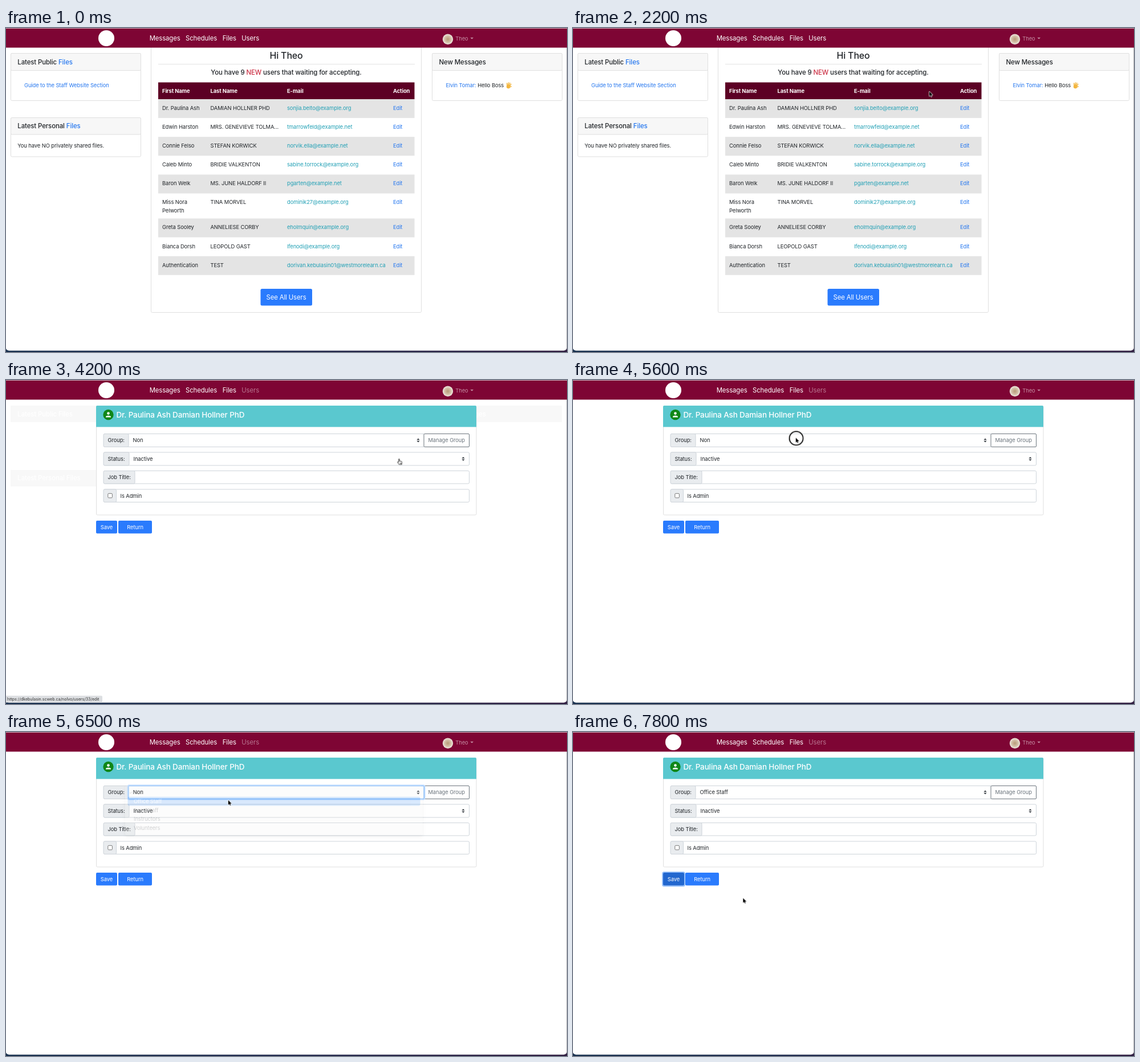
Animation of 984 by 569 pixels, one loop 8000 ms. Source, as an HTML page:

```html
<!DOCTYPE html>
<html lang="en">
<head>
<meta charset="utf-8">
<title>Staff dashboard</title>
<style>
html, body { margin: 0; width: 100%; height: 100%; overflow: hidden; background: #fff; }
svg { display: block; width: 984px; height: 569px; }
text { font: 9.4px Inter, "Noto Sans", sans-serif; letter-spacing: -.01em; fill: #212529; white-space: pre; }
.nav { font-size: 11.35px; fill: #fff; }
.h5 { font-size: 11.45px; font-weight: 500; }
.h3 { font-size: 16px; font-weight: 500; }
.title { font-size: 13.5px; font-weight: 500; fill: #fff; }
.th { font-weight: 700; fill: #fff; }
.mid { text-anchor: middle; }
.white { fill: #fff; }
.big { font-size: 11.35px; }
.dim { fill: #fff; fill-opacity: .55; }
.link { fill: #2577ef; }
.mail { fill: #22a0b5; }
.url { font-size: 7.05px; letter-spacing: 0; fill: #333; }
.box { fill: #fff; stroke: #dfdfdf; }
.cap { fill: #f7f7f7; stroke: #dfdfdf; }
.field { fill: #fff; stroke: #ced4da; }
.tag { fill: #e9ecef; stroke: #ced4da; }
.btn { fill: #2a7bfd; }
.soft { fill: #f8f8f8; }

/* 100 ms is 1.25% of the loop */
.a { animation: 8s step-end -10ms infinite; }
.home { animation-name: home; }
.form { animation-name: form; }
.ghost { animation-name: ghost; }
.status { animation-name: status; }
.hover { animation-name: hover; }
.edit { animation-name: edit; }
.dimmed { animation-name: dimmed; }
.menu { animation-name: menu; }
.mark { animation-name: mark; }
.first { animation-name: first; }
.second { animation-name: second; }
.focus { animation-name: focus; }
.before { animation-name: before; }
.after { animation-name: after; }
.save { animation-name: save; }
.saved { animation-name: saved; }
.ptr { animation-name: path, appear; }
.arrow { animation-name: arrow; }
.hand { animation-name: hand; }
.ring { animation-name: ring; }

@keyframes home { 0% { opacity: 1 } 52.5%, to { opacity: 0 } }
@keyframes form { 0% { opacity: 0 } 52.5%, to { opacity: 1 } }
@keyframes dimmed { 0% { fill-opacity: 1 } 52.5%, to { fill-opacity: .45 } }
@keyframes ghost { 0% { opacity: 0 } 52.5% { opacity: 1 } 53.75% { opacity: .5 } 55% { opacity: .2 } 56.25%, to { opacity: 0 } }
@keyframes status { 0% { opacity: 0 } 46.25% { opacity: .5 } 47.5% { opacity: 1 } 55% { opacity: .5 } 56.25%, to { opacity: 0 } }
@keyframes hover {
  0% { opacity: 0; y: 334.5px; height: 33px }
  15% { opacity: 1; y: 334.5px; height: 33px }
  20% { opacity: 1; y: 367.5px; height: 33px }
  21.25% { opacity: 1; y: 401px; height: 33px }
  22.5% { opacity: 1; y: 334.5px; height: 33px }
  23.75% { opacity: 1; y: 290.5px; height: 44px }
  25% { opacity: 1; y: 224.5px; height: 33px }
  26.25% { opacity: 1; y: 158px; height: 33px }
  27.5% { opacity: 0; y: 125px; height: 33px }
  38.75%, to { opacity: 1; y: 125px; height: 33px }
}
@keyframes edit { 0% { fill: #2577ef; text-decoration: none } 45%, to { fill: #1a57ac; text-decoration: underline } }
@keyframes menu { 0% { opacity: 0 } 71.25% { opacity: 1 } 81.25% { opacity: .2 } 82.5%, to { opacity: 0 } }
@keyframes mark { 0% { y: 98px } 75%, to { y: 113.7px } }
@keyframes first { 0% { fill: #fff } 75%, to { fill: #222 } }
@keyframes second { 0% { fill: #222 } 75%, to { fill: #fff } }
@keyframes focus { 0% { opacity: 0 } 71.25% { opacity: 1 } 91.25%, to { opacity: 0 } }
@keyframes before { 0% { opacity: 1 } 82.5%, to { opacity: 0 } }
@keyframes after { 0% { opacity: 0 } 82.5%, to { opacity: 1 } }
@keyframes save { 0% { fill: #2a7bfd } 90%, to { fill: #2267cf } }
@keyframes saved { 0% { opacity: 0 } 92.5%, to { opacity: 1 } }
@keyframes appear { 0% { opacity: 0 } 6.25%, to { opacity: 1 } }
@keyframes arrow { 0% { opacity: 1 } 45% { opacity: 0 } 55% { opacity: 1 } 88.75% { opacity: 0 } 96.25%, to { opacity: 1 } }
@keyframes hand { 0% { opacity: 0 } 45% { opacity: 1 } 55% { opacity: 0 } 88.75% { opacity: 1 } 96.25%, to { opacity: 0 } }
@keyframes ring { 0% { opacity: 0 } 70% { opacity: 1 } 71.25% { opacity: 0 } 80% { opacity: 1 } 81.25% { opacity: 0 } 91.25% { opacity: 1 } 92.5%, to { opacity: 0 } }
@keyframes path {
  0% { transform: translate(925px, 386px) }
  12.5% { transform: translate(925px, 386px); animation-timing-function: steps(3) }
  16.25% { transform: translate(360px, 344px) }
  18.75% { transform: translate(360px, 344px); animation-timing-function: steps(2) }
  21.25% { transform: translate(400px, 430px); animation-timing-function: steps(5) }
  27.5% { transform: translate(625px, 111.5px) }
  28.75% { transform: translate(625px, 111.5px); animation-timing-function: steps(4) }
  33.75% { transform: translate(523px, 118px) }
  35% { transform: translate(523px, 118px); animation-timing-function: steps(6) }
  42.5% { transform: translate(702px, 138px); animation-timing-function: steps(3) }
  46.25% { transform: translate(689.5px, 138.5px) }
  58.75% { transform: translate(689.5px, 138.5px); animation-timing-function: steps(2) }
  61.25% { transform: translate(439px, 187px) }
  63.75% { transform: translate(439px, 187px); animation-timing-function: steps(4) }
  68.75% { transform: translate(390.7px, 101.5px) }
  73.75% { transform: translate(390.7px, 101.5px); animation-timing-function: steps(2) }
  76.25% { transform: translate(389.8px, 119.7px) }
  81.25% { transform: translate(389.8px, 119.7px); animation-timing-function: steps(7) }
  90% { transform: translate(178px, 260px) }
  95% { transform: translate(178px, 260px); animation-timing-function: steps(2) }
  97.5%, to { transform: translate(298.3px, 291.7px) }
}
</style>
</head>
<body>
<svg viewBox="0 0 984 569">
  <defs>
    <linearGradient id="desk"><stop stop-color="#17304f"/><stop offset=".5" stop-color="#20294d"/><stop offset="1" stop-color="#2f1c40"/></linearGradient>
    <radialGradient id="photo"><stop stop-color="#b79a78"/><stop offset=".6" stop-color="#d3c0a8"/><stop offset="1" stop-color="#efe9e2"/></radialGradient>
    <filter id="shade" x="-5%" y="-20%" width="110%" height="150%"><feDropShadow dx="0" dy="3" stdDeviation="3" flood-opacity=".25"/></filter>
    <g id="sort" fill="#343a40"><path d="M-2.6-.8L0-3.6L2.6-.8ZM-2.6.8L0 3.6L2.6.8Z"/></g>
  </defs>

  <!-- window -->
  <rect y="560" width="984" height="9" fill="url(#desk)"/>
  <rect y="-10" width="984" height="576.5" rx="5" fill="#b4b4b8"/>
  <rect y="-10" width="983" height="576.5" rx="5" fill="#fff"/>

  <!-- dashboard -->
  <g class="a home">
    <rect class="box" x="254.5" y="20.5" width="474" height="479" rx="2"/>
    <text class="h3 mid" x="491.5" y="54">Hi Theo</text>
    <path d="M267 63.5H717" stroke="#e3e3e3"/>
    <text class="h5 mid" x="491.5" y="82.2">You have 9 <tspan fill="#cb3044">NEW</tspan> users that waiting for accepting.</text>
    <rect x="267" y="95.5" width="449.5" height="29.5" fill="#5c0024"/>
    <text class="th" x="274" y="113.8">First Name</text>
    <text class="th" x="358.5" y="113.8">Last Name</text>
    <text class="th" x="493" y="113.8">E-mail</text>
    <text class="th" x="679" y="113.8">Action</text>
    <g id="stripes"></g>
    <rect class="a hover" x="267" width="449.5" fill="#000" fill-opacity=".06"/>
    <g id="rows"></g>
    <rect class="btn" x="446.5" y="458" width="90.5" height="29.5" rx="2.5"/>
    <text class="big white mid" x="491.5" y="477">See All Users</text>

    <rect class="box" x="8.5" y="44.5" width="228" height="83" rx="2"/>
    <rect class="cap" x="8.5" y="44.5" width="228" height="30" rx="2"/>
    <text class="h5" x="20.3" y="63.8">Latest Public <tspan class="link">Files</tspan></text>
    <text class="link" x="32" y="104.4">Guide to the Staff Website Section</text>

    <rect class="box" x="8.5" y="157.5" width="228" height="68.5" rx="2"/>
    <rect class="cap" x="8.5" y="157.5" width="228" height="29.5" rx="2"/>
    <text class="h5" x="20.3" y="176.3">Latest Personal <tspan class="link">Files</tspan></text>
    <text x="20.3" y="209.8">You have NO privately shared files.</text>

    <rect class="box" x="747.5" y="44.5" width="228" height="83" rx="2"/>
    <rect class="cap" x="747.5" y="44.5" width="228" height="30" rx="2"/>
    <text class="h5" x="759.5" y="63.8">New Messages</text>
    <text x="771.5" y="104.4"><tspan class="link">Elvin Tomar:</tspan> Hello Boss</text>
    <g transform="translate(881.5 101) rotate(12)" stroke="#f3b63f" stroke-linecap="round" fill="none">
      <path d="M-2.6 0L-3.6-3.4M-1-1V-5M.9-1L1.5-4.8M2.4 0L3.8-3.2M2 3L5 .6" stroke-width="1.5"/>
      <ellipse cy="1.8" rx="2.8" ry="3" fill="#f3b63f"/>
    </g>
  </g>

  <!-- leftovers of the previous page -->
  <g class="a ghost">
    <path class="soft" d="M8 45H975V74H8ZM8 158H236V187H8Z"/>
    <text class="h5 white" x="20.3" y="63.8">Latest Public Files</text>
    <text class="h5 white" x="20.3" y="176.3">Latest Personal Files</text>
    <text class="h5 white" x="759.5" y="63.8">New Messages</text>
  </g>

  <!-- user form -->
  <g class="a form">
    <rect class="box" x="158.5" y="45.5" width="666.5" height="191.5" rx="2"/>
    <path d="M158 82.5V47a2 2 0 0 1 2-2H823a2 2 0 0 1 2 2V82.5Z" fill="#5ac8cf"/>
    <circle cx="179.5" cy="61" r="9.2" fill="#108718"/>
    <path d="M175 65.5v-1c0-2.8 9-2.8 9 0v1Z" fill="#fff"/>
    <circle cx="179.5" cy="58.6" r="2.3" fill="#fff"/>
    <text class="title" x="193.5" y="65.8">Dr. Paulina Ash Damian Hollner PhD</text>

    <rect class="field" x="171.5" y="94.5" width="641" height="23" rx="2"/>
    <rect class="tag" x="171" y="94.5" width="44" height="23" rx="2"/>
    <text x="178.5" y="109.4">Group:</text>
    <rect x="733" y="94.5" width="79.5" height="23" rx="1.5" fill="#fff" stroke="#6c757d"/>
    <text class="mid" x="772.7" y="109.4" style="fill:#6c757d">Manage Group</text>
    <g class="a focus" fill="#fff">
      <rect x="214" y="94" width="520" height="24" rx="2" stroke="#bfdcff" stroke-width="3"/>
      <rect x="215" y="94.8" width="518" height="22.4" rx="1.5" stroke="#74b2f8"/>
    </g>
    <text class="a before" x="222.5" y="109.4">Non</text>
    <text class="a after" x="222.5" y="109.4">Office Staff</text>
    <use href="#sort" x="723" y="106"/>

    <rect class="field" x="171.5" y="127" width="641" height="23" rx="2"/>
    <rect class="tag" x="171" y="127" width="45" height="23" rx="2"/>
    <text x="178.5" y="141.9">Status:</text>
    <text x="223.5" y="141.9">Inactive</text>
    <use href="#sort" x="802" y="138.5"/>

    <rect class="field" x="171.5" y="159.5" width="641" height="22.5" rx="2"/>
    <rect class="tag" x="171" y="159.5" width="55" height="22.5" rx="2"/>
    <text x="178.5" y="174.3">Job Title:</text>

    <rect class="field" x="171.5" y="192" width="641" height="22.5" rx="2"/>
    <rect class="tag" x="171" y="192" width="22.5" height="22.5" rx="2"/>
    <rect x="178.8" y="199.3" width="7.6" height="7.6" rx="1.5" fill="#fff" stroke="#777"/>
    <text x="200.5" y="206.7">Is Admin</text>

    <rect class="a saved" x="157.2" y="246.2" width="38.6" height="24.2" rx="2.5" fill="none" stroke="#8fbcfb" stroke-width="2"/>
    <rect class="btn a save" x="158" y="247" width="37" height="22.5" rx="2"/>
    <text class="white mid" x="176.5" y="261.7">Save</text>
    <rect class="btn" x="197" y="247" width="59" height="22.5" rx="2"/>
    <text class="white mid" x="226.6" y="261.7">Return</text>

    <g class="a menu">
      <rect x="209" y="94" width="522" height="87" rx="4" fill="#f1f1f1" filter="url(#shade)"/>
      <rect class="a mark" x="213.5" width="513" height="15.7" rx="2.5" fill="#3f8ff5"/>
      <text class="a first" x="216" y="109.3" style="font-size:6.5px">✓</text>
      <text class="a first" x="224" y="109.3">Non</text>
      <text class="a second" x="224" y="125">Office Staff</text>
      <text x="224" y="140.7">Barn Staff</text>
      <text x="224" y="156.4">Instructors</text>
      <text x="224" y="172.1">Volunteers</text>
    </g>
  </g>

  <!-- top bar -->
  <rect width="984" height="1" fill="#cdb7c0"/>
  <rect y="1" width="984" height="33.5" fill="#7e0534"/>
  <circle cx="176" cy="18" r="14" fill="#fff"/>
  <text class="nav" x="251.7" y="22.2">Messages</text>
  <text class="nav" x="315" y="22.2">Schedules</text>
  <text class="nav" x="379.7" y="22.2">Files</text>
  <text class="nav a dimmed" x="413.3" y="22.2">Users</text>
  <circle cx="775" cy="19.7" r="9.2" fill="url(#photo)"/>
  <text class="dim" x="788.3" y="21.8">Theo</text>
  <path class="dim" d="M814.3 16.8H820L817.2 19.6Z"/>

  <!-- link address -->
  <g class="a status">
    <path d="M0 554.5H167a2 2 0 0 1 2 2V566.5H0Z" fill="#dcdee1"/>
    <text class="url" x="2" y="563">https://dkebulasin.scweb.ca/nolvo/users/33/edit</text>
  </g>

  <!-- pointer -->
  <g class="a ptr">
    <circle class="a ring" cx=".8" cy=".9" r="12" fill="none" stroke="#000" stroke-width="1.8"/>
    <path class="a arrow" d="M0 0V8.2L1.9 6.4L3.2 9.3L4.5 8.7L3.2 5.9H5.9Z" stroke="#fff" stroke-width="1.3" stroke-linejoin="round" paint-order="stroke"/>
    <path class="a hand" d="M-.8.8C-.8-.3.8-.3.8.8V3.8L4 4.5C5 4.7 5.4 5.3 5.2 6.3L4.6 10H.2L-2.6 6.4C-3.2 5.5-2.2 4.8-1.5 5.4L-.8 6Z M2 7V8.6M3.4 7V8.6" fill="#fff" stroke="#111" stroke-width=".9" stroke-linejoin="round"/>
  </g>
</svg>
<script>
const users = [
  ["Dr. Paulina Ash", "DAMIAN HOLLNER PHD", "sonjia.belto@example.org"],
  ["Edwin Harston", "MRS. GENEVIEVE TOLMA...", "tmarrowfeld@example.net"],
  ["Connie Felso", "STEFAN KORWICK", "norvik.ella@example.net"],
  ["Caleb Minto", "BRIDIE VALKENTON", "sabine.torrock@example.org"],
  ["Baron Welk", "MS. JUNE HALDORF II", "pgarten@example.net"],
  ["Miss Nora|Pelworth", "TINA MORVEL", "dominik27@example.org"],
  ["Greta Sooley", "ANNELIESE CORBY", "eholmquin@example.org"],
  ["Bianca Dorsh", "LEOPOLD GAST", "lfenodi@example.org"],
  ["Authentication", "TEST", "dorivan.kebulasin01@westmorelearn.ca"]
];
const label = (x, y, s, cls = "") => `<text class="${cls}" x="${x}" y="${y}">${s}</text>`;
let rowY = 125, stripes = "", rows = "";
users.forEach(([first, last, mail], i) => {
  const lines = first.split("|");
  const height = lines.length > 1 ? 44 : 33.1;
  const base = rowY + 18.9;
  if (i % 2 == 0) stripes += `<rect x="267" y="${rowY}" width="449.5" height="${height}" fill="#e4e4e4"/>`;
  lines.forEach((s, n) => rows += label(274, base + n * 14.5, s));
  rows += label(358.5, base, last) + label(493, base, mail, "mail")
    + label(679, base, "Edit", i ? "link" : "link a edit");
  rowY += height;
});
document.getElementById("stripes").innerHTML = stripes;
document.getElementById("rows").innerHTML = rows;
</script>
</body>
</html>
```
